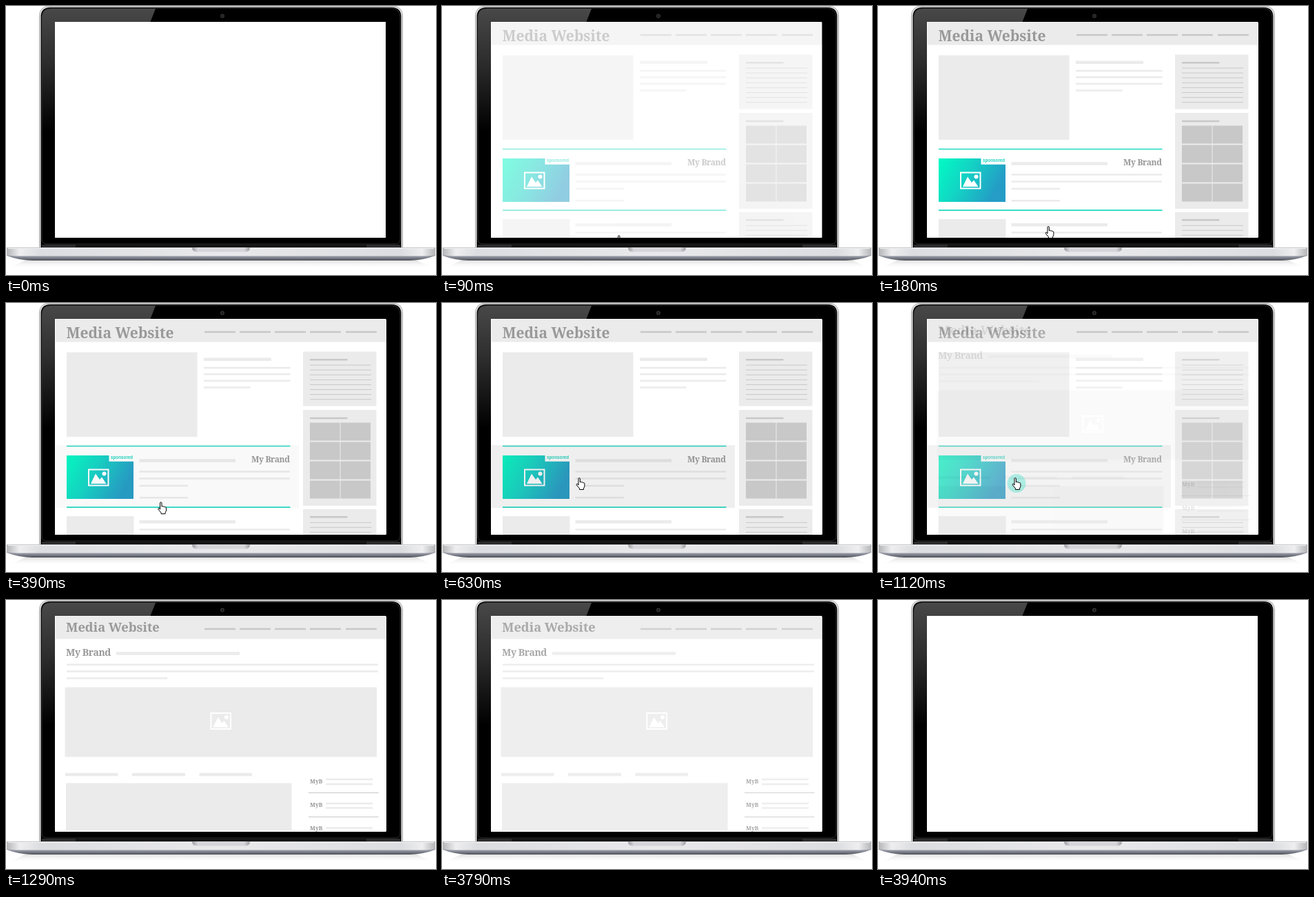
Write an HTML page that moves like this. It is 624 px wide and 390 px high and loops after 3970 ms.

```html
<!DOCTYPE html>
<html lang="en">
<head>
<meta charset="utf-8">
<title>Sponsored article on a laptop</title>
<style>
html, body { margin: 0; width: 100%; height: 100%; overflow: hidden; background: #fff }
svg { display: block; width: 624px; height: 390px }
text { font-family: "Noto Serif", "Liberation Serif", serif; font-weight: bold; fill: #999 }
.brand { letter-spacing: -.03em }
.tag { font: bold 6.3px "Liberation Sans", Arial, sans-serif; fill: #1cd3bd }
.pale { stroke: #ebebeb; fill: none }
.mid { stroke: #c8c8c8; fill: none }
.box { fill: #ebebeb }
</style>
</head>
<body>
<svg viewBox="0 0 624 390">
<defs>
  <linearGradient id="gloss" x2="0" y2="1">
    <stop stop-color="#484848"/><stop offset=".25" stop-color="#2e2e2e"/><stop offset=".6" stop-color="#000"/>
  </linearGradient>
  <linearGradient id="deck">
    <stop stop-color="#b4b5b8"/><stop offset=".03" stop-color="#eeeef0"/><stop offset=".08" stop-color="#dcdde0"/>
    <stop offset=".5" stop-color="#e9e9ec"/><stop offset=".92" stop-color="#dcdde0"/>
    <stop offset=".97" stop-color="#eeeef0"/><stop offset="1" stop-color="#b4b5b8"/>
  </linearGradient>
  <linearGradient id="belly" x2="0" y2="1">
    <stop stop-color="#b0b3bc"/><stop offset=".5" stop-color="#868a95"/><stop offset="1" stop-color="#4c4f57"/>
  </linearGradient>
  <linearGradient id="notch">
    <stop stop-color="#9b9ca1"/><stop offset=".1" stop-color="#d6d6da"/>
    <stop offset=".9" stop-color="#d6d6da"/><stop offset="1" stop-color="#9b9ca1"/>
  </linearGradient>
  <linearGradient id="shade" x2="0" y2="1">
    <stop stop-color="#ccc" stop-opacity=".7"/><stop offset="1" stop-color="#eee" stop-opacity="0"/>
  </linearGradient>
  <clipPath id="screen"><rect x="71" y="23" width="481" height="313" rx="1.500"/></clipPath>
  <linearGradient id="teal" y2=".35">
    <stop stop-color="#00fbc4"/><stop offset=".45" stop-color="#12d6c4"/><stop offset="1" stop-color="#249cc6"/>
  </linearGradient>
  <g id="header">
    <path fill="#fff" d="M72 23.500h480V336H72z"/>
    <path class="box" d="M72 23.500h480V56.500H72z"/>
    <path class="mid" stroke-width="2.400" d="M288 42h45m6 0h45m6 0h45m6 0h45m7 0h45"/>
  </g>
  <g id="picture">
    <path fill="none" stroke="#fff" stroke-width="2" d="M1 1h28.500v23H1z"/>
    <path fill="#fff" d="M4 21.500L11 7l6 8.500 3-3.500 6.500 9.500z"/>
    <circle cx="23.500" cy="7" r="3" fill="#fff"/>
  </g>
</defs>

<path fill="url(#shade)" d="M30 368H594L618 379H6z"/>
<path fill="#e6e8e6" stroke="#a2a4a2" d="M48.500 350V15Q48.500 .5 63 .5H561Q575.500 .5 575.500 15V350"/>
<path d="M50.500 350V16Q50.500 2 64.500 2H559.500Q573.500 2 573.500 16V350z"/>
<path fill="url(#gloss)" d="M52 300V17Q52 4 65 4H217L209.500 23H71V300z"/>
<path fill="none" stroke="#3c3c3c" stroke-width=".8" d="M52 338V17Q52 3.500 65 3.500H559Q572 3.500 572 17V338Q572 345 565 345H59Q52 345 52 338z"/>
<path fill="#2b2b2d" d="M52 346H572V350H52z"/>
<path fill="#151515" d="M101 346H523V350H101z"/>
<circle cx="314" cy="14.500" r="3" fill="#333"/>
<circle cx="314" cy="14.500" r="1.500" fill="#15171b"/>
<path fill="#fff" d="M71 23H551V336H71z"/>
<path fill="url(#belly)" d="M1 360H623V362Q608 368 586 369H38Q16 368 1 362z"/>
<path fill="url(#deck)" d="M1 350H623V361Q615 362.500 600 362.500H24Q9 362.500 1 361z"/>
<path stroke="#c4c4c8" d="M2 350.500H622"/>
<path stroke="#f4f4f6" d="M3 351.500H621"/>
<path fill="url(#notch)" d="M270 350H354Q354 356.500 347 356.500H277Q270 356.500 270 350z"/>

<g clip-path="url(#screen)">
  <g id="home">
    <use href="#header"/>
    <text x="87.500" y="51" font-size="21">Media Website</text>
    <path class="box" d="M88 71.500h189.500V194H88zM431 70.500h106.500v79H431zm0 84.500h106.500v139H431zm0 144h106.500v37H431zM88 309h97.500v27H88z"/>
    <path class="pale" stroke-width="4.500" d="M287 81.700h98M193.500 228.500H333M193.500 317.300H333"/>
    <path class="pale" stroke-width="2.600" d="M287 94h125.500M287 103.300h125.500M287 112.800h125.500M287 122.500h67.500M193.500 244.500h218.500M193.500 254.500h218.500M193.500 265H264M193.500 282.300H264M193.500 328.500h218.500"/>
    <path class="mid" stroke-width="2.400" d="M441 82.300h54.500M441 167h54.500M441 310.300h54.500"/>
    <path id="lines" class="mid"/>
    <path id="tiles" fill="#c8c8c8"/>
    <path stroke="#1fdac2" stroke-width="1.300" d="M88 207.500H412.500"/>
    <path stroke="#1fdac2" stroke-width="1.800" d="M88 296.200H412.500"/>
    <text class="brand" x="356" y="231" font-size="12">My Brand</text>
    <path fill="url(#teal)" d="M88 221h97v63H88z"/>
    <use href="#picture" x="119" y="240.500"/>
    <path fill="#fff" d="M149.500 219H185.500V229.700H149.500z"/>
    <text class="tag" x="152" y="226.300">sponsored</text>
    <path id="hover" fill="#5f5f5f" d="M72 206H425V297H72z"/>
    <circle id="ripple" cx="201" cy="261.500" fill="#14dcbe" opacity=".42"/>
  </g>
  <g id="article">
    <use href="#header"/>
    <text x="87" y="46" font-size="18.300">Media Website</text>
    <text class="brand" x="87" y="81" font-size="14">My Brand</text>
    <path class="pale" stroke-width="4.500" d="M160 77.500H339M86 253h76.500M183 253h77M280.500 253H357"/>
    <path class="pale" stroke-width="2.600" d="M88 93.700H540M88 103.500H540M88 113.500H234M464 260h68m-68 7h68M464 295h68m-68 6.500h68M464 330.500h68"/>
    <path class="box" d="M85.500 126.500H538V227.500H85.500zM87 265.500H414.500V334.500H87z"/>
    <use href="#picture" x="296.500" y="163"/>
    <path class="mid" stroke-width="1.200" d="M439 279.500H540.500M439 314.500H540.500"/>
    <g font-size="8.300"><text x="441" y="266">MyB</text><text x="441" y="300">MyB</text><text x="441" y="334">MyB</text></g>
  </g>
  <path id="hand" fill="#fff" stroke="#000" stroke-linejoin="round" d="M3.500 11V1.800c0-1.600 2.400-1.600 2.400 0V7c.3-1 2.200-1 2.400.3c.5-.8 2-.6 2.200.6c.6-.6 1.900-.2 1.900 1v4l-1.400 3v1.600h-6v-1.600L.8 10.800c-.7-1.300.8-2.200 1.700-1.200z"/>
</g>
</svg>
<script>
const $ = id => document.getElementById(id);
const clamp = v => Math.min(1, Math.max(0, v));
const show = (id, alpha) => $(id).setAttribute("opacity", clamp(alpha));

let lines = "", tiles = "";
for (let i = 0; i < 8; i++) {
  lines += `M441 ${90 + i * 7.1}h89`;
  if (i < 3) lines += `M441 ${318.3 + i * 7}h89`;
  tiles += `M${441 + i % 2 * 44.5} ${173.5 + (i >> 1) * 28}h43.500v26h-43.500z`;
}
$("lines").setAttribute("d", lines);
$("tiles").setAttribute("d", tiles);

function articleAlpha(t) {
  if (t < 1120) return 0;
  if (t < 1190) return .25;
  if (t < 1290) return .6;
  return t < 3790 ? 1 : 1 - (Math.floor((t - 3790) / 30) + 1) / 6;
}

function draw() {
  const t = performance.now() % 3970;
  const tick = Math.floor(t / 30) * 30;
  const article = articleAlpha(t);
  show("home", t < 1290 ? tick / 180 : 0);
  show("article", article);
  show("hover", clamp((tick - 330) / 150) * .1);
  $("ripple").setAttribute("r", t < 1030 ? 0 : Math.min(13.5, 4.5 * (1 + Math.floor((t - 1030) / 30))));

  // The pointer travels in a straight line to the sponsored teaser.
  const left = Math.max(0, (630 - tick) / 450);
  $("hand").setAttribute("transform", `translate(${194.5 + 48 * left} ${253 + 66 * left})`);
  show("hand", t < 30 || t >= 1290 ? 0 : (1 - article) / .75);
  requestAnimationFrame(draw);
}
draw();
</script>
</body>
</html>
```
